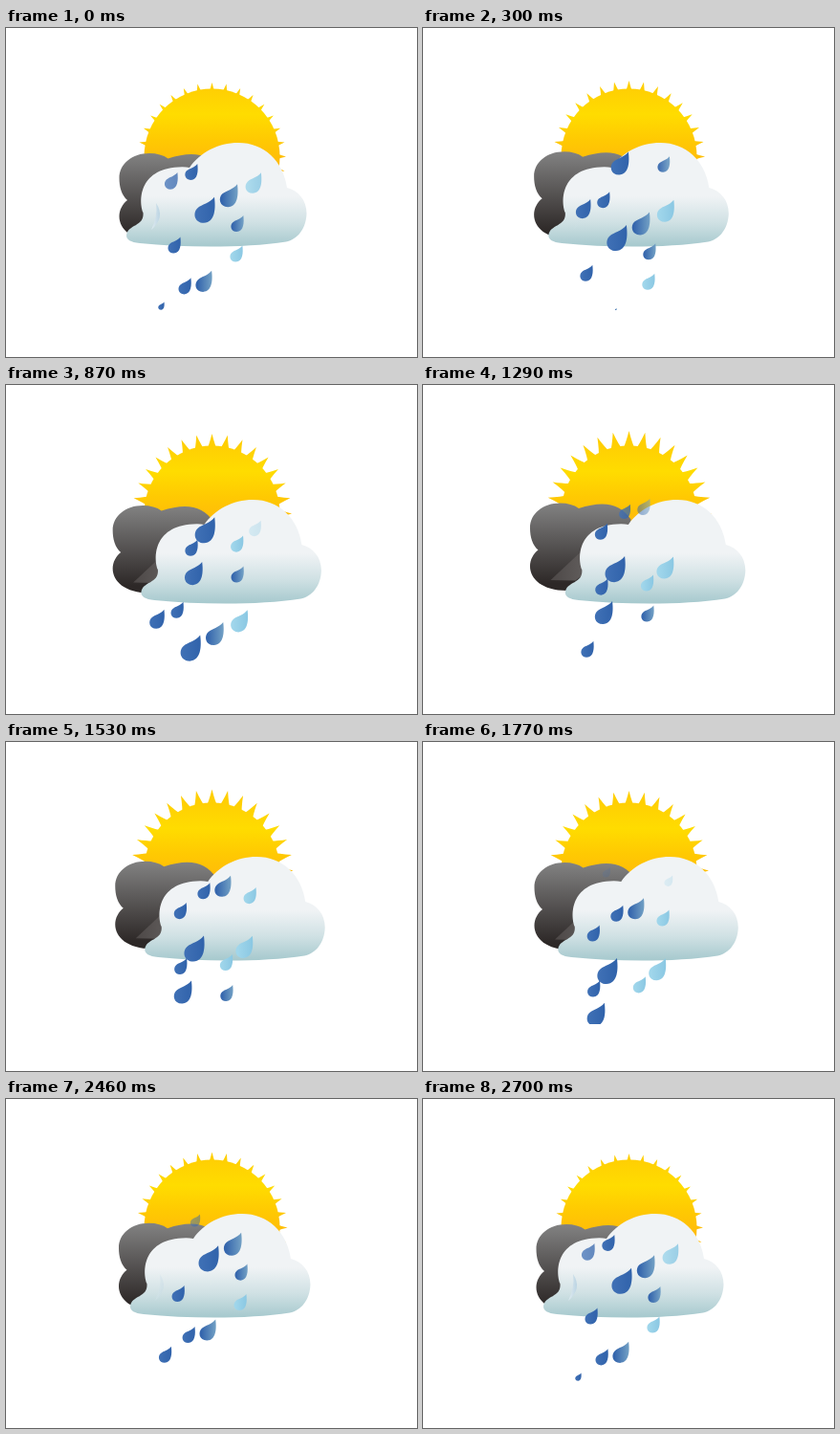
Animation of 430x344 px, one loop 2.73 s. Source, as an HTML page with a canvas:

```html
<!DOCTYPE html>
<html lang="en">
<head>
<meta charset="utf-8">
<title>Sun, clouds and rain</title>
<style>
html, body { margin: 0; overflow: hidden; background: #fff; }
canvas { display: block; }
</style>
</head>
<body>
<canvas id="stage" width="430" height="344"></canvas>
<script>
const ctx = document.getElementById('stage').getContext('2d');
const STEP = 30, LOOP = 2730, CYCLE = 2700;
const FALL = 0.0975, DRIFT = 0.1745, TOP = 110, GROUND = 295;

const backCloud = new Path2D('M127 180C121 175 118.5 166 118.5 157C118.5 142 132 131 150 131Q162 131 169.5 136.5C195 128 213 131 224 148L224 205L157 222.5C131 222.5 118.5 210 118.5 197C118.5 190 122 184 127 180Z');
const backFold = new Path2D('M140 211.5L171 182.5L182 200L166 212Z');
const frontCloud = new Path2D('M126 217C127 205 145 208 143.5 193C139 182 138 148 180 145.5Q187 145 192 146C203 130 222 120 243 120C270 120 290 139 294 167C306 170 314.5 180 314.5 194C314 210 305 221 293 223.5C250 230 190 230 140 225C130 224 126 221 126 217Z');
const crescent = new Path2D('M157 183Q167 198 152 211Q159 197 157 183Z');
const dropShape = new Path2D('M10 -13.5C11.5 -2 11 13 -1 13.6C-11 13.6 -13 3 -7.5 -2C-3 -6 5 -7 10 -13.5Z');

function gradient(x0, y0, x1, y1, ...colours) {
  const g = ctx.createLinearGradient(x0, y0, x1, y1);
  colours.forEach((c, i) => g.addColorStop(i / (colours.length - 1), c));
  return g;
}
const sunFill = gradient(0, -71, 0, 10, '#ffcf03', '#ffdc00', '#ffc902', '#ffb90a');
const backFill = gradient(0, 131, 0, 215, '#828282', '#2d2827');
const foldFill = gradient(139, 0, 172, 0, '#4c4746', '#5f5b5a');
const frontFill = gradient(0, 176, 0, 230, '#f0f3f5', '#d0e1e4', '#a3c7cc');
const crescentFill = gradient(150, 0, 163, 0, '#e9f1f4', '#b3cfe0');
const dropFill = {
  b: gradient(-9, 0, 10, 0, '#3f70b5', '#3163ab'),
  m: gradient(-8, 0, 10, 0, '#3566ad', '#719fc4'),
  l: gradient(-8, 0, 10, 0, '#a0d6eb', '#8bc8e3')
};

// time at y = 130, x there, height, tint, first y, last y
const drops = [
  [-306, 178, 20, 'b', 145, 256],
  [-209, 197.5, 17, 'b'],
  [-618, 218.5, 27, 'b'],
  [-463, 241, 24, 'm'],
  [-328, 264.5, 23, 'l', 145, 280],
  [-764, 255, 17, 'm', 130, 280],
  [-994, 193, 17, 'b', 133],
  [-1086, 259.5, 17, 'l', 140],
  [-1434, 211.5, 17, 'b'],
  [-1383, 230.5, 22, 'm'],
  [-1648, 190.5, 17, 'b'],
  [458, 201, 17, 'b'],
  [648, 212, 27, 'b'],
  [500, 248, 17, 'l', 130],
  [182, 208, 24, 'b'],
  [172, 254, 17, 'm', 124, 280],
  [665, 264, 23, 'l', 143, 280],
  [1216, 260.5, 17, 'l', 140, 240]
];

const clamp = v => Math.max(0, Math.min(1, v));
const mod = (a, n) => ((a % n) + n) % n;

// piecewise linear through [time, value] pairs
function track(points, t) {
  const i = Math.max(1, points.findIndex(p => p[0] >= t));
  const [t0, a] = points[i - 1], [t1, b] = points[i];
  return a + (b - a) * (t - t0) / (t1 - t0);
}

function at(x, y, draw) {
  ctx.save();
  ctx.translate(x, y);
  draw();
  ctx.restore();
}

function fill(shape, style) {
  ctx.fillStyle = style;
  ctx.fill(shape);
}

function drawSun(reach) {
  const rays = new Path2D(), disc = new Path2D();
  const polar = (r, step) => {
    const a = step * Math.PI / 16;
    return [r * reach * Math.cos(a), r * reach * Math.sin(a)];
  };
  rays.moveTo(reach, 0);
  for (let i = 0; i < 32; i++) {
    rays.quadraticCurveTo(...polar(0.84, i + 0.25), ...polar(0.78, i + 0.5));
    rays.quadraticCurveTo(...polar(0.84, i + 0.75), ...polar(1, i + 1));
  }
  disc.arc(0, 0, 71, 0, 7);
  fill(rays, sunFill);
  fill(disc, sunFill);
}

function drawDrop([start, x, height, tint, first = 117, last = GROUND], t) {
  const lead = (130 - TOP) / FALL;
  const y = TOP + mod(t - start + lead, CYCLE) * FALL;
  if (y <= first || y >= last) return;
  const grow = clamp((y - first) / 20);
  const size = height / 27 * (0.55 + 0.45 * grow) * clamp((last - y) / 9);
  at(x - (y - 130) * DRIFT, y, () => {
    ctx.scale(size, size);
    ctx.globalAlpha = grow;
    fill(dropShape, dropFill[tint]);
  });
}

function render(now) {
  const t = Math.floor(now % LOOP / STEP) * STEP % CYCLE;
  const swing = track([[0, 0], [1300, 1], [CYCLE, 0]], t);
  const backX = track([[0, 0], [1080, -8.5], [1770, -2], [CYCLE, 0]], t);

  ctx.clearRect(0, 0, 430, 344);
  at(215.5, 134.5, () => drawSun(77.5 + 9 * swing));
  at(backX, -7.5 * swing, () => {
    fill(backCloud, backFill);
    ctx.clip(backCloud);
    fill(backFold, foldFill);
  });
  at(23 * swing, 0, () => {
    fill(frontCloud, frontFill);
    ctx.globalAlpha = clamp(1 - 4 * swing);
    fill(crescent, crescentFill);
  });
  at(0, 0, () => {
    ctx.beginPath();
    ctx.rect(0, 0, 430, GROUND);
    ctx.clip();
    drops.forEach(d => drawDrop(d, t));
  });
}

const origin = performance.now();
function tick() {
  render(performance.now() - origin);
  requestAnimationFrame(tick);
}
tick();
</script>
</body>
</html>
```
